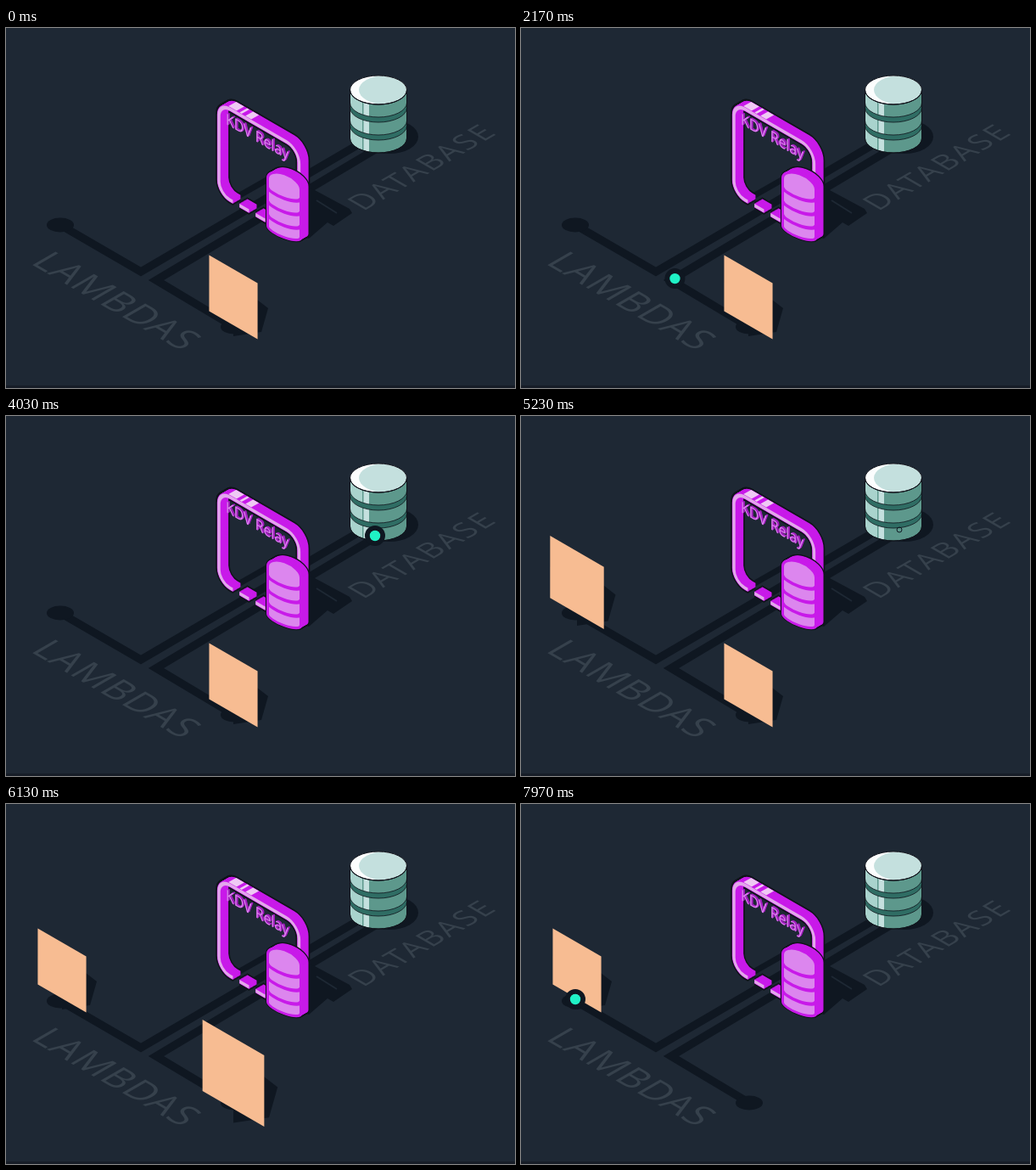
These frames come from a looping animation (600x424 px, 8000 ms). An HTML page with a canvas:

```html
<!DOCTYPE html>
<html lang="en">
<head>
<meta charset="utf-8">
<title>Pooled connections</title>
<style>
html, body { margin: 0; width: 100%; height: 100%; overflow: hidden; background: #1e2834; }
canvas { display: block; width: 600px; height: 424px; }
</style>
</head>
<body>
<canvas id="stage" width="600" height="424"></canvas>
<script>
const ctx = document.getElementById('stage').getContext('2d');
const LOOP = 8000;
const C = {
  bg: '#1e2834', floor: '#0f1721', label: '#36414c', ink: '#10131b',
  purple: '#c81ae9', pale: '#e3a6ec', lilac: '#dc86ee', orange: '#f7bc92', dot: '#1ff2c6'
};
const COS = 0.866;

// time helpers
const clamp = v => Math.max(0, Math.min(1, v));
const span = (t, a, b) => clamp((t - a) / (b - a));
const mix = (a, b, p) => a + (b - a) * p;
const inOut = p => 0.5 - 0.5 * Math.cos(Math.PI * p);
const quadOut = p => 1 - (1 - p) * (1 - p);

// drawing helpers
function within(matrix, draw) {
  ctx.save();
  ctx.transform(...matrix);
  draw();
  ctx.restore();
}
const wall = (x, y) => [COS, 0.5, 0, 1, x, y];

// repeats a shape from back to front along the depth axis
function extrude([a, b, c, d, x, y], depth, draw) {
  for (let k = depth; k >= 0; k -= 0.5) within([a, b, c, d, x + k, y - k * 0.577], draw);
}

function polygon(color, ...pts) {
  ctx.fillStyle = color;
  ctx.beginPath();
  pts.forEach(p => ctx.lineTo(...p));
  ctx.fill();
}

function ellipse(color, x, y, rx, ry = rx) {
  ctx.fillStyle = color;
  ctx.beginPath();
  ctx.ellipse(x, y, rx, ry, 0, 0, Math.PI * 2);
  ctx.fill();
}

function line(color, width, pts) {
  ctx.strokeStyle = color;
  ctx.lineWidth = width;
  ctx.beginPath();
  pts.forEach(p => ctx.lineTo(...p));
  ctx.stroke();
}

function strokeShape(shape, color, width) {
  ctx.strokeStyle = color;
  ctx.lineWidth = width;
  ctx.stroke(shape);
}

function floorText(text, size, spacing, matrix) {
  within(matrix, () => {
    ctx.font = `${size}px "Open Sans", "Noto Sans", sans-serif`;
    ctx.letterSpacing = spacing + 'px';
    ctx.fillStyle = C.label;
    ctx.fillText(text, 0, 0);
  });
}

const routeLeft = [[64, 232], [159, 287], [414, 138]];
const routeRight = [[269, 352], [177, 297], [437, 142]];

function drawFloor() {
  ctx.fillStyle = C.bg;
  ctx.fillRect(0, 0, 600, 424);
  ctx.fillStyle = '#171d27';
  ctx.fillRect(0, 421, 600, 3);
  floorText('LAMBDAS', 44, 0.8, [COS, 0.5, -COS, 0.5, 27.5, 277]);
  floorText('DATABASE', 35, 2.3, [COS, -0.5, COS, 0.5, 421, 216]);
  ctx.lineJoin = 'miter';
  line(C.floor, 9.5, routeLeft);
  line(C.floor, 9.5, routeRight);
  ellipse(C.floor, 64, 232, 16, 8.5);
  ellipse(C.floor, 269, 352, 16, 8.5);
  ellipse(C.floor, 452, 128, 34, 20);
  // shadow cast by the frame
  line(C.floor, 7, [[272, 199], [318, 173], [356, 190]]);
  polygon(C.floor, [352, 187], [364, 191], [405, 213], [408, 218], [386, 233],
    [379, 229], [357, 248], [345, 244]);
  line(C.bg, 2, [[366, 203], [390, 218]]);
}

function drawTile(x, y, scale) {
  if (scale <= 0) return;
  ctx.save();
  ctx.translate(x, y);
  ctx.scale(scale, scale);
  polygon(C.floor, [0, 16], [28, 3], [41, 13], [33, 41], [0, 46]);
  within(wall(0, 0), () => {
    ctx.fillStyle = C.orange;
    ctx.fillRect(-33, -33, 66, 66);
  });
  ctx.restore();
}

function drumSide(top, bottom) {
  ctx.beginPath();
  ctx.ellipse(439, bottom, 33.5, 17, 0, 0, Math.PI);
  ctx.ellipse(439, top, 33.5, 17, 0, Math.PI, 0, true);
  ctx.closePath();
}

function drawDatabase() {
  ctx.fillStyle = '#2f6d64';
  drumSide(73, 130);
  ctx.fill();
  for (const [top, bottom] of [[73, 88], [94, 109], [115, 130]]) {
    ctx.save();
    drumSide(top, bottom);
    ctx.clip();
    ctx.fillStyle = '#5d988c';
    ctx.fillRect(405, 56, 69, 92);
    ctx.fillStyle = '#a9d3cd';
    ctx.fillRect(405, 56, 15, 92);
    ctx.fillStyle = '#c4e0de';
    ctx.fillRect(421.5, 56, 6.5, 92);
    ctx.restore();
    ctx.strokeStyle = C.ink;
    ctx.lineWidth = 0.8;
    drumSide(top, bottom);
    ctx.stroke();
  }
  ellipse('#fbfdfd', 439, 73, 33.5, 17);
  ctx.save();
  ctx.beginPath();
  ctx.ellipse(439, 73, 33, 16.5, 0, 0, Math.PI * 2);
  ctx.clip();
  ellipse('#c4e0de', 447, 73, 31, 17);
  ctx.restore();
  ctx.strokeStyle = C.ink;
  ctx.lineWidth = 1;
  ctx.beginPath();
  ctx.ellipse(439, 73, 33.5, 17, 0, 0, Math.PI * 2);
  ctx.stroke();
  drumSide(73, 130);
  ctx.stroke();
}

// open rounded frame with two loose pieces along its lower edge
const frame = new Path2D();
frame.moveTo(109, 46);
frame.arcTo(109, 0, 0, 0, 17);
frame.arcTo(0, 0, 0, 107, 15);
frame.arcTo(0, 107, 109, 107, 15);
frame.lineTo(19, 107);
for (const x of [28, 50]) {
  frame.moveTo(x, 107);
  frame.lineTo(x + 13, 107);
}

const drum = new Path2D();
drum.ellipse(19.5, 0, 19.5, 12, 0, Math.PI, 0);
drum.ellipse(19.5, 56, 19.5, 7, 0, 0, Math.PI);
drum.closePath();

function drawFrame() {
  const [x, y, depth] = [251, 88, 9];
  const place = wall(x, y);
  ctx.lineJoin = 'round';
  extrude(place, depth, () => strokeShape(frame, C.ink, 9));
  extrude(place, depth, () => strokeShape(frame, C.purple, 5));
  // glints on the upper face
  for (const [from, to] of [[13, 24], [28, 31], [36, 44]]) {
    const a = [x + from * COS, y - 2.5 + from * 0.5];
    const b = [x + to * COS, y - 2.5 + to * 0.5];
    polygon('#efc9f4', a, [a[0] + depth, a[1] - 5], [b[0] + depth, b[1] - 5], b);
  }
  within(place, () => strokeShape(frame, C.pale, 4));
}

function drawTitle() {
  ctx.font = '500 18.3px "Open Sans", "Noto Sans", sans-serif';
  ctx.letterSpacing = '0px';
  const title = color => () => {
    ctx.fillStyle = color;
    ctx.fillText('KDV Relay', 0, 0);
  };
  const place = wall(259, 113);
  extrude(place, 2, title('#a31fc0'));
  within(place, title(C.lilac));
}

function drawDrum() {
  const place = [1, 0.35, 0, 1, 308.5, 177];
  extrude(place, 8, () => strokeShape(drum, C.ink, 5));
  extrude(place, 8, () => {
    ctx.fillStyle = C.purple;
    ctx.fill(drum);
    strokeShape(drum, C.purple, 2);
  });
  within(place, () => {
    ctx.fillStyle = C.lilac;
    ctx.fill(drum);
    ctx.save();
    ctx.clip(drum);
    for (const level of [10, 26, 42]) {
      ctx.beginPath();
      ctx.ellipse(19.5, level, 19.5, 7, 0, 0, Math.PI);
      ctx.strokeStyle = C.purple;
      ctx.lineWidth = 4;
      ctx.stroke();
    }
    ctx.restore();
    strokeShape(drum, C.purple, 3);
  });
}

function drawProxy() {
  drawFrame();
  drawTitle();
  drawDrum();
}

function drawDot(x, y, scale, ring = 6) {
  if (scale <= 0) return;
  ctx.strokeStyle = C.floor;
  ctx.lineWidth = ring * scale;
  ctx.beginPath();
  ctx.arc(x, y, 9 * scale, 0, Math.PI * 2);
  ctx.stroke();
  ctx.globalAlpha = span(scale, 0.33, 0.6);
  ellipse(C.dot, x, y, 6.2 * scale);
  ctx.globalAlpha = 1;
}

function along(pts, p) {
  const lengths = pts.slice(1).map((b, i) => Math.hypot(b[0] - pts[i][0], b[1] - pts[i][1]));
  let left = p * lengths.reduce((a, b) => a + b);
  let i = 0;
  while (i < lengths.length - 1 && left > lengths[i]) left -= lengths[i++];
  const q = left / lengths[i];
  return [mix(pts[i][0], pts[i + 1][0], q), mix(pts[i][1], pts[i + 1][1], q)];
}

function drawRequest(t) {
  const trip = [[267, 350], [180, 296], [435, 141]];
  const [x, y] = along(trip, inOut(span(t, 1227, 4000)));
  const sink = span(t, 4300, 5230);
  const size = quadOut(span(t, 570, 900)) * mix(1, 0.33, sink) * (1 - span(t, 5250, 5400));
  drawDot(x + 11 * sink, y - 7 * sink, size, mix(6, 3, sink));
  drawDot(64, 230, quadOut(span(t, 7500, 7830)));
}

function leftScale(t) {
  return t < 5560 ? 1.3 * quadOut(span(t, 4700, 5560)) : mix(1.3, 1, inOut(span(t, 5560, 6130)));
}

function rightScale(t) {
  return t < 6230 ? mix(1, 1.29, inOut(span(t, 5600, 6230))) : 1.29 * (1 - span(t, 6230, 6980) ** 2);
}

function render(t) {
  drawFloor();
  drawTile(66, 196, leftScale(t));
  drawDatabase();
  if (t < 4000) drawRequest(t);
  drawProxy();
  drawTile(268, 317, rightScale(t));
  // at either end of its trip the dot sits in front
  if (t < 1900 || t >= 4000) drawRequest(t);
}

const start = performance.now();
function tick() {
  render((performance.now() - start) % LOOP);
  requestAnimationFrame(tick);
}
tick();
</script>
</body>
</html>
```
